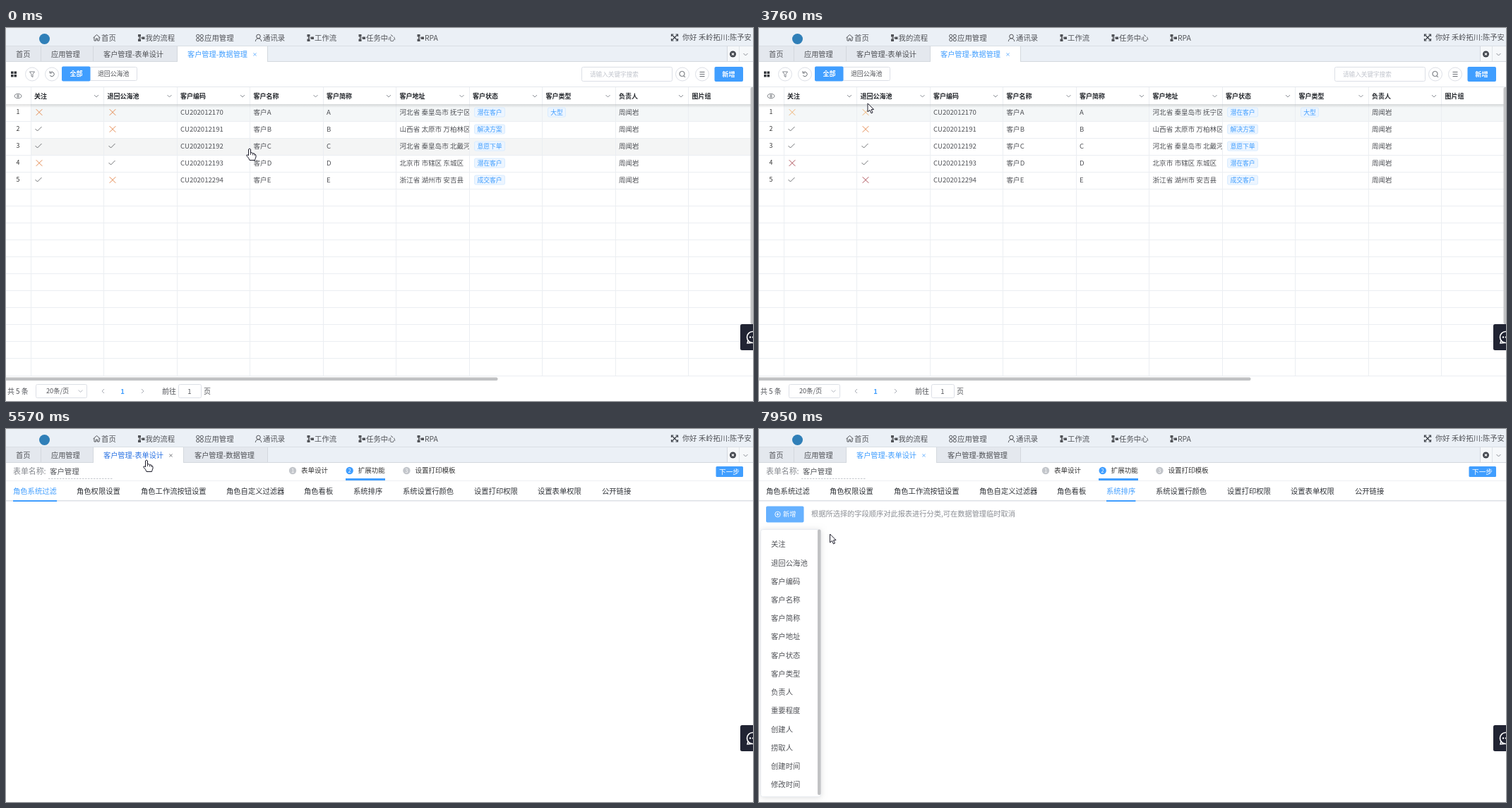
Write an HTML page with a canvas that moves like this. It is 1058 px wide and 529 px high and loops after 8 s.

```html
<!DOCTYPE html>
<html lang="zh">
<head>
<meta charset="utf-8">
<style>
html, body { margin: 0; width: 100%; height: 100%; overflow: hidden; background: #fff; }
canvas { display: block; }
</style>
</head>
<body>
<canvas id="stage" width="1058" height="529"></canvas>
<script>
const ctx = document.getElementById('stage').getContext('2d');
const W = 1058, H = 529, LOOP = 8000;
const FONT = '"Noto Sans CJK SC", "Noto Sans CJK", "Noto Sans", sans-serif';
const BLUE = '#409eff', DEEP_BLUE = '#2b73e3', INK = '#505257', ORANGE = '#e58a50', BORDER = '#dcdfe6';
const COL = 103.5, ROW = 24, TOP = 108;

const HEADS = ['关注', '退回公海池', '客户编码', '客户名称', '客户简称', '客户地址', '客户状态', '客户类型', '负责人', '图片组'];
const ROWS = [
  [0, 0, 'CU202012170', 'A', '河北省 秦皇岛市 抚宁区', '潜在客户'],
  [1, 0, 'CU202012191', 'B', '山西省 太原市 万柏林区', '解决方案'],
  [1, 1, 'CU202012192', 'C', '河北省 秦皇岛市 北戴河区', '意愿下单'],
  [0, 1, 'CU202012193', 'D', '北京市 市辖区 东城区', '潜在客户'],
  [1, 0, 'CU202012294', 'E', '浙江省 湖州市 安吉县', '成交客户']
];
const SUBTABS = [['角色系统过滤', 10], ['角色权限设置', 100], ['角色工作流按钮设置', 191], ['角色自定义过滤器', 312],
  ['角色看板', 422], ['系统排序', 492], ['系统设置行颜色', 562], ['设置打印权限', 663], ['设置表单权限', 753], ['公开链接', 844]];
const FIELDS = ['关注', '退回公海池', '客户编码', '客户名称', '客户简称', '客户地址', '客户状态', '客户类型',
  '负责人', '重要程度', '创建人', '捞取人', '创建时间', '修改时间'];

// Pointer path: time, x, y
const PATH = [
  [0, 345, 171], [200, 345, 171], [270, 332, 171], [410, 332, 171], [790, 312, 116], [1120, 312, 116],
  [1260, 306, 140], [1420, 303, 147], [1570, 303, 147], [2360, 340, 222], [2440, 340, 220], [2770, 337, 197],
  [3230, 170, 92], [3310, 166, 98], [3500, 168, 213], [3760, 154, 107], [4090, 150, 78], [4160, 152, 76],
  [4600, 190, 48], [4870, 199, 44], [5710, 199, 44], [5980, 500, 86], [6100, 481, 80], [6480, 478, 108],
  [6560, 478, 110], [6950, 220, 143], [7350, 42, 121], [7870, 42, 121], [7950, 100.5, 149], [8000, 100.5, 149]
];

function pointerAt(t) {
  const i = Math.max(1, PATH.findIndex(p => p[0] > t));
  const [t0, x0, y0] = PATH[i - 1], [t1, x1, y1] = PATH[i];
  const k = (t - t0) / (t1 - t0);
  return { x: x0 + (x1 - x0) * k, y: y0 + (y1 - y0) * k };
}

function rect(x, y, w, h, color) { ctx.fillStyle = color; ctx.fillRect(x, y, w, h); }

function text(s, x, y, size, color = INK, weight = 400, align = 'left') {
  ctx.font = `${weight} ${size}px ${FONT}`;
  ctx.textAlign = align;
  ctx.fillStyle = color;
  ctx.fillText(s, x, y + size * 0.37);
}

function box(x, y, w, h, r, fill, stroke) {
  ctx.beginPath();
  ctx.roundRect(x + 0.5, y + 0.5, w - 1, h - 1, r);
  if (fill) { ctx.fillStyle = fill; ctx.fill(); }
  if (stroke) { ctx.strokeStyle = stroke; ctx.lineWidth = 1; ctx.stroke(); }
}

function pill(x, y, w, h, r, color) {
  ctx.beginPath();
  ctx.roundRect(x, y, w, h, r);
  ctx.fillStyle = color;
  ctx.fill();
}

function line(points, color, width = 1) {
  ctx.beginPath();
  points.forEach(([x, y], i) => i ? ctx.lineTo(x, y) : ctx.moveTo(x, y));
  ctx.strokeStyle = color;
  ctx.lineWidth = width;
  ctx.stroke();
}

function ring(x, y, r, color, width = 1, from = 0, to = Math.PI * 2) {
  ctx.beginPath();
  ctx.arc(x, y, r, from, to);
  ctx.strokeStyle = color;
  ctx.lineWidth = width;
  ctx.stroke();
}

function disc(x, y, r, color) {
  ctx.beginPath();
  ctx.arc(x, y, r, 0, Math.PI * 2);
  ctx.fillStyle = color;
  ctx.fill();
}

function cross(x, y, r, color, width = 1) {
  line([[x - r, y - r], [x + r, y + r]], color, width);
  line([[x + r, y - r], [x - r, y + r]], color, width);
}

const chevron = (x, y, color = '#8c9097', r = 3) => line([[x - r, y - r / 2], [x, y + r / 2], [x + r, y - r / 2]], color);

const navIcons = {
  home(x, y) {
    line([[x - 5, y], [x, y - 4.5], [x + 5, y]], INK);
    line([[x - 3.5, y - 1], [x - 3.5, y + 4], [x - 1, y + 4], [x - 1, y + 1], [x + 1, y + 1], [x + 1, y + 4], [x + 3.5, y + 4], [x + 3.5, y - 1]], INK);
  },
  flow(x, y) {
    line([[x - 2, y - 3], [x - 2, y + 3]], INK);
    line([[x - 2, y], [x + 3, y]], INK);
    rect(x - 4, y - 5, 4, 3.5, INK);
    rect(x - 4, y + 1.5, 4, 3.5, INK);
    rect(x + 1.5, y - 1.5, 4, 3.5, INK);
  },
  apps(x, y) {
    for (const dx of [-2.8, 2.8]) for (const dy of [-2.6, 2.6]) ring(x + dx, y + dy, 2.1, INK);
  },
  person(x, y) {
    ring(x, y - 2, 2.8, INK);
    ring(x, y + 5, 4.2, INK, 1, Math.PI, Math.PI * 2);
  }
};
const NAV = [['首页', 135, 'home'], ['我的流程', 197.5, 'flow'], ['应用管理', 281, 'apps'], ['通讯录', 364, 'person'],
  ['工作流', 437, 'flow'], ['任务中心', 510, 'flow'], ['RPA', 593, 'flow']];

function drawTab(label, x, w, textX, active, hovered) {
  rect(x, 26, w, 22, active ? '#fff' : '#e4e8ee');
  rect(x + w - 1, 26, 1, 22, '#d3d8de');
  text(label, textX, 37, 10.2, hovered ? DEEP_BLUE : active ? BLUE : INK);
  if (active) cross(x + w - 18.5, 37.5, 2, hovered ? INK : BLUE, 0.8);
}

function drawTop(t, pointer) {
  rect(0, 0, W, 48, '#ebf0f6');
  rect(0, 25, W, 1, '#d9dee4');
  disc(54.5, 15.5, 7.5, '#2f7fb8');
  for (const [label, x, icon] of NAV) {
    navIcons[icon](x - 6.5, 14);
    text(label, x, 14, 10.4);
  }
  cross(947, 13.5, 4, '#3f434a', 1.2);
  for (const sx of [-1, 1]) for (const sy of [-1, 1])
    line([[947 + sx * 1.5, 13.5 + sy * 4.5], [947 + sx * 4.5, 13.5 + sy * 4.5], [947 + sx * 4.5, 13.5 + sy * 1.5]], '#3f434a', 1.2);
  text('你好 禾岭拓川:陈予安', 958, 13.5, 10.3);

  const design = t >= 4800;
  const overTab = pointer.y < 48 && pointer.x > 123 && pointer.x < 242;
  drawTab('首页', 0, 50, 14, false);
  drawTab('应用管理', 50, 74, 64, false);
  drawTab('客户管理-表单设计', 124, design ? 128 : 119, 138, design, overTab);
  drawTab('客户管理-数据管理', design ? 252 : 243, design ? 119 : 128, design ? 267 : 257, !design);
  rect(0, 47, 124, 1, '#d3d8de');
  rect(design ? 252 : 124, 47, design ? W - 252 : 119, 1, '#d3d8de');
  rect(371, 47, W - 371, 1, '#d3d8de');
  rect(1021, 26, 37, 21, '#f6f8fa');
  rect(1021, 26, 1, 21, '#d3d8de');
  rect(1038, 26, 1, 21, '#e0e4e8');
  disc(1029.5, 37, 4.5, '#42464d');
  cross(1029.5, 37, 1.6, '#fff', 1.2);
  chevron(1047.5, 37.5);
}

function drawToolbar() {
  for (const x of [7, 11.5]) for (const y of [61.5, 66]) rect(x, y, 3.5, 3.5, '#33363b');
  for (const x of [37, 65, 958, 986]) ring(x, 65.5, 9.5, BORDER);
  line([[33.5, 62], [40.5, 62], [38, 65.5], [38, 69.5], [36, 68.5], [36, 65.5], [33.5, 62]], '#777b82', 0.9);
  ring(65, 65.5, 3.2, '#666a70', 1, -2.4, 2.6);
  line([[62, 61], [62, 64], [65, 64]], '#666a70', 0.9);
  box(79, 55, 107, 20, 2, '#fff', BORDER);
  pill(79, 54.5, 40.5, 21, 2, BLUE);
  text('全部', 99.5, 65, 9, '#fff', 700, 'center');
  text('退回公海池', 130, 65, 8.9);
  box(815, 55, 129, 21, 2, '#fff', BORDER);
  text('请输入关键字搜索', 827, 65.5, 8.6, '#c0c4cc');
  ring(957.5, 65, 3.6, '#666a70');
  line([[960, 68], [962, 70]], '#666a70');
  for (const y of [62, 65, 68]) rect(982.5, y, 7, 1, '#666a70');
  pill(1003.5, 55, 40.5, 21, 2, BLUE);
  text('新增', 1023.5, 65.5, 9.2, '#fff', 700, 'center');
}

function crossColor(row, t) {
  if (t < 2000 || row === 2) return ORANGE;
  if (t < 3400) return row === 0 ? ORANGE : '#55575b';
  return ['#f0b273', ORANGE, ORANGE, '#ad4f58', '#ad4f58'][row];
}

function drawMark(on, x, y, color) {
  if (on) line([[x - 5.5, y - 0.5], [x - 2.5, y + 2.5], [x + 3.5, y - 3.5]], '#606266', 0.9);
  else cross(x, y, 4.3, color);
}

function drawTag(label, x, y, w) {
  box(x, y - 7, w, 14, 2, '#ecf5ff', '#d9ecff');
  text(label, x + w / 2, y, 8.8, BLUE, 500, 'center');
}

function drawTable(t, pointer) {
  drawToolbar();
  const hovered = pointer.y < TOP ? -1 : Math.floor((pointer.y - TOP) / ROW);
  for (let r = 0; r < 5; r++) {
    const tint = r === 0 ? '#f4f7f8' : r === hovered ? '#f4f5f5' : null;
    if (tint) rect(36, TOP + r * ROW, W - 36, ROW, tint);
  }
  for (let y = TOP + ROW; y < 492; y += ROW) rect(0, y, W, 1, '#ebeef2');
  for (let c = 0; c < 10; c++) rect(Math.round(35 + c * COL - 0.1), 84, 1, 409, '#ebeef2');
  rect(0, 83, W, 1, '#e4e7ec');
  const shade = ctx.createLinearGradient(0, TOP, 0, TOP + 5);
  shade.addColorStop(0, 'rgba(0,0,0,.13)');
  shade.addColorStop(1, 'rgba(0,0,0,0)');
  rect(0, TOP, W, 5, shade);

  ctx.beginPath();
  ctx.ellipse(17, 96.5, 4.8, 3, 0, 0, Math.PI * 2);
  ctx.strokeStyle = '#666a70';
  ctx.lineWidth = 0.9;
  ctx.stroke();
  ring(17, 96.5, 1.3, '#666a70');
  HEADS.forEach((head, c) => {
    text(head, 40 + c * COL, 96.5, 9, '#25282d', 700);
    if (c < 9) chevron(128 + c * COL, 96.5);
  });

  ROWS.forEach(([starred, back, code, letter, address, status], r) => {
    const y = 119.5 + r * ROW;
    text(r + 1, 17, y - 0.5, 8.8, '#333', 400, 'center');
    drawMark(starred, 47, y, crossColor(r, t));
    drawMark(back, 151, y, crossColor(r, t));
    text(code, 247, y, 9.6);
    text('客户' + letter, 350.5, y, 9.6);
    text(letter, 454, y, 9.6);
    ctx.save();
    ctx.beginPath();
    ctx.rect(553, y - 10, 103, 20);
    ctx.clip();
    text(address, 557.5, y, 9.6);
    ctx.restore();
    drawTag(status, 663, y, 44);
    text('周闻岩', 868, y, 9.5);
  });
  drawTag('大型', 767, 119.5, 26);

  rect(0, 493, W, 1, '#ebeef2');
  pill(-4, 495.5, 700.5, 4.5, 2, '#c1c2c4');
  pill(1054.5, 84, 6, 336, 2, '#c1c2c4');
  text('共 5 条', 2, 515, 9.9);
  box(42, 505, 73, 20, 2, '#fff', BORDER);
  text('20条/页', 57, 515, 9.2);
  chevron(105.5, 515, '#b5b9c1');
  line([[139, 512], [136, 515], [139, 518]], '#a9adb5');
  text('1', 165, 515, 9.5, BLUE, 700, 'center');
  line([[192, 512], [195, 515], [192, 518]], '#a9adb5');
  text('前往', 221, 515, 10);
  box(244, 505, 33, 20, 2, '#fff', BORDER);
  text('1', 260, 515, 9.5, INK, 400, 'center');
  text('页', 280, 515, 10);
}

function drawForm(t, pointer) {
  text('表单名称:', 10, 60, 10.9, '#85888e');
  text('客户管理', 62, 60.5, 10.4);
  for (let x = 60; x < 151; x += 4) rect(x, 70, 2.5, 1, '#c4c7cc');
  ['表单设计', '扩展功能', '设置打印模板'].forEach((label, i) => {
    const x = 406 + i * 80.7;
    disc(x, 59, 5.2, i === 1 ? BLUE : '#c3c6cb');
    text(i + 1, x, 59, 7.5, '#fff', 400, 'center');
    text(label, x + 12, 58.5, 9.5, '#333', 500);
  });
  rect(0, 73, W, 1, '#eef0f3');
  rect(481, 70, 56, 3, BLUE);
  pill(1005.5, 53, 38.5, 15, 1.5, BLUE);
  text('下一步', 1024.5, 60, 9.6, '#fff', 400, 'center');

  const sorting = t >= 6000;
  const active = sorting ? 5 : 0;
  rect(0, 101, W, 1.5, '#dde0e6');
  SUBTABS.forEach(([label, x], i) => {
    text(label, x, 88.5, 10.3, i === active ? BLUE : '#303338');
    if (i === active) rect(x, 101, label.length * 10.35, 2, BLUE);
  });
  if (!sorting) return;

  const lit = t >= 7420 || (pointer.x < 63 && pointer.y > 109 && pointer.y < 132);
  pill(10, 109.5, 53.5, 23, 2, lit ? '#66b1ff' : BLUE);
  ring(26.5, 121, 3.8, '#fff', 0.9);
  line([[24.5, 121], [28.5, 121]], '#fff', 0.9);
  line([[26.5, 119], [26.5, 123]], '#fff', 0.9);
  text('新增', 34, 121, 9.2, '#fff', 500);
  text('根据所选择的字段顺序对此报表进行分类,可在数据管理临时取消', 74, 120.5, 10.22, '#8b8e94');
  if (t >= 7420) drawDropdown(Math.min(1, (t - 7390) / 300));
}

function drawDropdown(k) {
  const ease = 1 - (1 - k) ** 3;
  ctx.save();
  ctx.globalAlpha = ease;
  ctx.translate(0, 142);
  ctx.scale(1, ease);
  ctx.translate(0, -142);
  ctx.save();
  ctx.shadowColor = 'rgba(0,0,0,.14)';
  ctx.shadowBlur = 8;
  ctx.shadowOffsetY = 1;
  box(2, 142, 86, 380, 3, '#fff');
  ctx.restore();
  box(2, 142, 86, 380, 3, null, '#e8ebf0');
  pill(83, 142.5, 4.5, 376.5, 2, '#c1c2c4');
  FIELDS.forEach((field, i) => text(field, 17, 163.5 + i * 26.23, 10.35));
  ctx.restore();
}

function drawChat() {
  pill(1040, 420, 24, 37, 2.5, '#212433');
  ring(1057.5, 438.5, 8, '#fff', 1.6);
  line([[1051, 443], [1050, 447], [1056, 446.5]], '#fff', 1.5);
  disc(1054, 438.5, 1.2, '#fff');
  disc(1058, 438.5, 1.2, '#fff');
}

const HAND = new Path2D('M-1.5 1Q0-1 1.5 1V6Q4 5 4.5 7Q7 6 7 8Q9 8 9 10V12Q8 14 7.5 16.5H0Q-1 13-4 10.5Q-5 8.5-2.5 9L-1.5 10Z');
const ARROW = new Path2D('M0 0V12L3 9.5L5 14L7 13L5 8.8L8.5 8.5Z');

function drawPointer({ x, y }, t) {
  const onTable = t < 5340 && y >= TOP;
  const onTabs = y < 50 || (t > 5800 && y > 52 && y < 102);
  const onButton = t > 6500 && x < 63 && y < 132;
  ctx.save();
  ctx.translate(x, y);
  const shape = onTable || onTabs || onButton ? HAND : ARROW;
  ctx.fillStyle = '#fff';
  ctx.fill(shape);
  ctx.strokeStyle = '#1c1c2a';
  ctx.lineWidth = 1;
  ctx.stroke(shape);
  if (shape === HAND) {
    line([[1.5, 6], [1.5, 9]], '#1c1c2a', 0.8);
    line([[4.5, 7], [4.5, 9.5]], '#1c1c2a', 0.8);
    line([[7, 8], [7, 10]], '#1c1c2a', 0.8);
  }
  ctx.restore();
}

function draw(t) {
  const pointer = pointerAt(t);
  rect(0, 0, W, H, '#fff');
  drawTop(t, pointer);
  if (t < 5340) drawTable(t, pointer);
  else if (t >= 5490) drawForm(t, pointer);
  drawChat();
  if (t >= 5110 && t < 5490) {
    const turn = (t - 5260) / 400 * Math.PI * 2;
    ring(1040, 15, 8, '#4aa3f5', 1.5, turn - 0.1, turn + 1.75);
  }
  drawPointer(pointer, t);
}

const start = performance.now();
function tick() {
  draw((performance.now() - start) % LOOP);
  requestAnimationFrame(tick);
}
tick();
</script>
</body>
</html>
```
